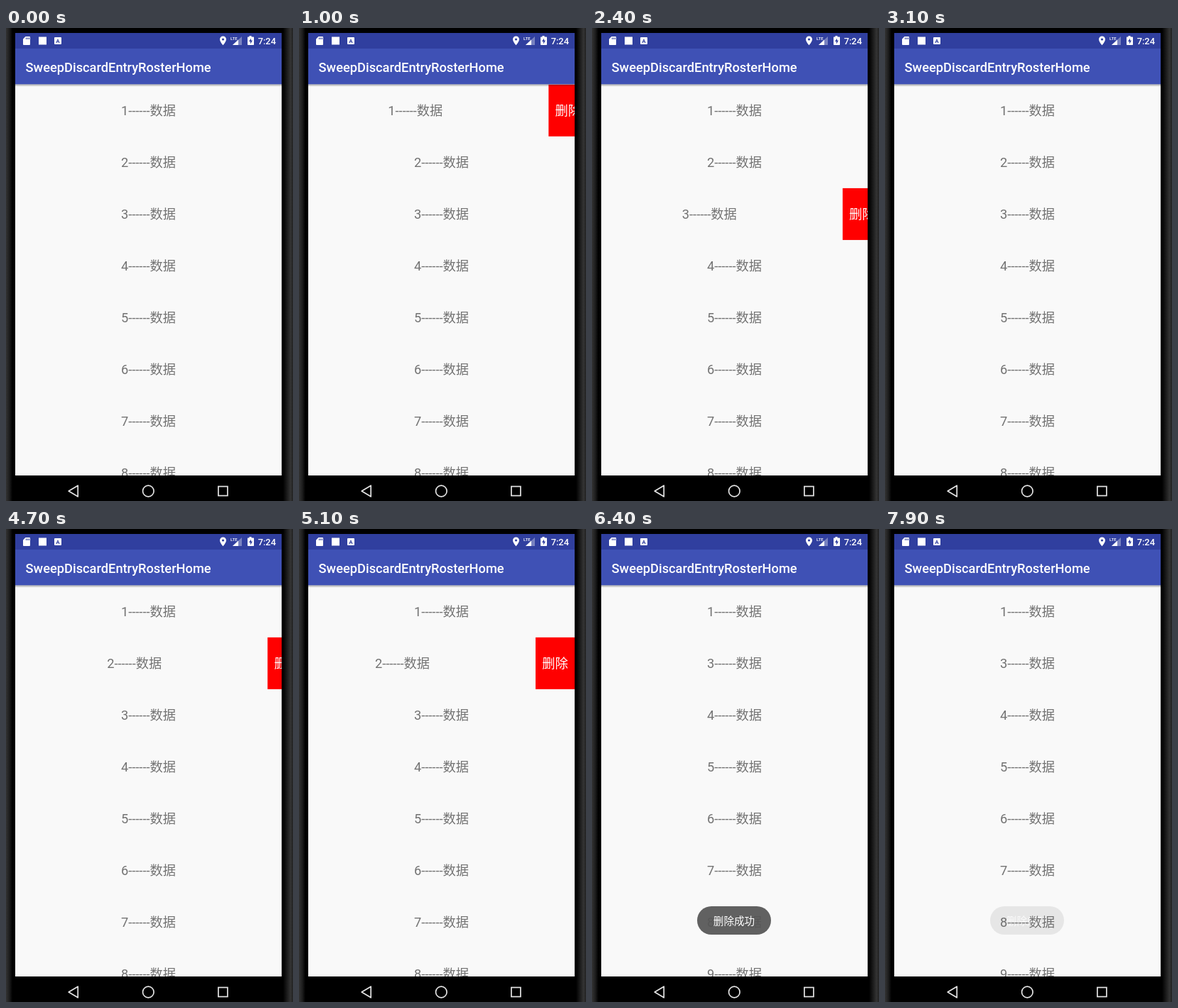
These frames come from a looping animation (404x667 px, 8000 ms). An HTML page:

```html
<!DOCTYPE html>
<html lang="zh-CN">
<head>
<meta charset="utf-8">
<title>Swipe to delete</title>
<style>
  html, body { margin: 0; width: 100%; height: 100%; overflow: hidden; background: #000; }
  svg { display: block; width: 404px; height: 667px; }
  text { font-family: Roboto, "Noto Sans CJK SC", "Noto Sans CJK", sans-serif; }
  .mid { text-anchor: middle; }
  .item { font-size: 18.25px; fill: #737373; }
  .delete { font-size: 18.25px; fill: #fff; }
  .bar { font-weight: 500; fill: #fff; }
</style>
</head>
<body>
<svg viewBox="0 0 404 667">
  <defs>
    <clipPath id="screen"><rect x="13" y="79" width="375" height="552"/></clipPath>
    <linearGradient id="shadow" x2="0" y2="1">
      <stop stop-opacity=".35"/><stop offset="1" stop-opacity="0"/>
    </linearGradient>
    <linearGradient id="leftEdge">
      <stop stop-color="#333"/><stop offset=".55" stop-color="#1c1c1c"/><stop offset="1"/>
    </linearGradient>
    <linearGradient id="rightEdge">
      <stop/><stop offset=".75" stop-color="#333"/><stop offset="1" stop-color="#222"/>
    </linearGradient>
  </defs>

  <rect width="404" height="667"/>
  <rect width="9" height="667" fill="url(#leftEdge)"/>
  <rect x="390" width="14" height="667" fill="url(#rightEdge)"/>

  <rect x="13" y="79" width="375" height="552" fill="#f9f9f9"/>
  <g clip-path="url(#screen)"><g id="list"></g></g>
  <rect x="13" y="79.300" width="375" height="3.500" fill="url(#shadow)"/>

  <rect x="13" y="7" width="375" height="22" fill="#303f9f"/>
  <rect x="13" y="29" width="375" height="50.300" fill="#3f51b5"/>
  <text class="bar" x="27.6" y="61.500" font-size="18.250">SweepDiscardEntryRosterHome</text>

  <!-- status icons -->
  <g fill="#fff">
    <path d="M27.500 12H33q1 0 1 1v10q0 1-1 1h-8q-1 0-1-1v-7.500z"/>
    <path d="M28.500 13.500v2.500m2-2.500v2.500m2-2.500v2.500" stroke="#303f9f"/>
    <rect x="46" y="12.500" width="11" height="11"/>
    <rect x="68" y="13" width="10" height="10" rx="1"/>
    <text class="mid" x="73" y="21" font-size="8" font-weight="700" style="fill:#303f9f">A</text>
    <path fill-rule="evenodd" d="M305.500 11.500a4.500 4.500 0 0 1 4.500 4.500c0 3.300-4.500 8.300-4.500 8.300s-4.500-5-4.500-8.300a4.500 4.500 0 0 1 4.500-4.500zm0 2.900a1.600 1.600 0 1 0 0 3.200 1.600 1.600 0 0 0 0-3.200z"/>
    <path d="M332 12v12h-13z" opacity=".35"/>
    <path d="M327 16.600V24h-8z"/>
    <text class="bar" x="316" y="16.500" font-size="6">LTE</text>
    <path d="M342.500 11h3v1.500h2.700q.8 0 .8.800v10q0 .7-.8.700h-7.400q-.8 0-.8-.700v-10q0-.8.800-.800h1.700z"/>
    <path d="M345 14.500l-3 4.500h2v3.500l3-5h-2z" fill="#303f9f"/>
  </g>
  <text class="bar" x="354.700" y="22.800" font-size="12.800">7:24</text>

  <!-- navigation icons -->
  <g fill="none" stroke="#e4e4e4" stroke-width="1.700">
    <path d="M88.200 653l13-7.800v15.600z" stroke-linejoin="round"/>
    <circle cx="200.300" cy="653" r="7.800"/>
    <rect x="298.900" y="646.500" width="13" height="13"/>
  </g>

  <g id="toast">
    <rect x="148" y="532" width="104" height="40" rx="20" fill="#555" fill-opacity=".92"/>
    <text class="mid" x="200" y="557.500" font-size="14.600" fill="#fff">删除成功</text>
  </g>
</svg>
<script>
const LOOP = 8000, STEP = 100;
const ROW = 73.04, TOP = 79.8, LEFT = 13, RIGHT = 388, BUTTON = 55;
const REMOVED = 2;

// Times in ms: the row opens, closes, pulls a glow out of the left edge and lets it go.
const swipes = {
  1: { open: 700, opened: 800, close: 900, closed: 1200, release: 1700, faded: 2000, glow: 8 },
  2: { open: 4600, opened: 5100 },
  3: { open: 2200, opened: 2700, close: 2900, closed: 3100, release: 3300, faded: 3500, glow: 5 }
};

const clamp = v => Math.min(1, Math.max(0, v));
const progress = (t, from, to) => clamp((t - from) / (to - from)) || 0;
const easeIn = p => p * p;
const easeOut = p => 1 - easeIn(1 - p);
const easeInOut = p => (1 - Math.cos(Math.PI * p)) / 2;

const swipeOffset = (s, t) =>
  BUTTON * (easeOut(progress(t, s.open, s.opened)) - progress(t, s.close, s.closed));

const glowDepth = (s, t) =>
  s.glow * (progress(t, s.closed, s.release) - easeIn(progress(t, s.release, s.faded))) || 0;

function glowPath(depth) {
  const rim = depth * .58, bulge = 2 * depth - rim;
  return `M${LEFT} 0h${rim}Q${LEFT + bulge} ${ROW / 2} ${LEFT + rim} ${ROW}H${LEFT}z`;
}

const list = document.getElementById('list');
const toast = document.getElementById('toast');
list.innerHTML = Array.from({ length: 9 }, (_, i) => `
  <g>
    <g>
      <text class="item mid" x="200.5" y="43.2">${i + 1}------数据</text>
      <rect x="${RIGHT}" width="${BUTTON}" height="${ROW}" fill="#f00"/>
      <text class="delete mid" x="${RIGHT + BUTTON / 2}" y="43.2">删除</text>
    </g>
    <path fill="#3f51b5"/>
  </g>`).join('');
const rows = [...list.children];

function draw(t) {
  const gap = easeInOut(progress(t, 6020, 6270));
  rows.forEach((row, i) => {
    const id = i + 1;
    const [content, glow] = row.children;
    const y = TOP + ROW * (i - (id > REMOVED ? gap : 0));
    row.setAttribute('transform', `translate(0 ${y})`);
    const swipe = swipes[id];
    if (!swipe) return;
    const depth = glowDepth(swipe, t);
    content.setAttribute('transform', `translate(${-swipeOffset(swipe, t)} 0)`);
    glow.setAttribute('d', glowPath(depth));
    glow.setAttribute('opacity', .38 * clamp(depth / 7));
  });
  rows[REMOVED - 1].setAttribute('opacity', 1 - progress(t, 5790, 6015));
  toast.setAttribute('opacity',
    easeOut(progress(t, 5780, 6310)) - easeIn(progress(t, 7450, 7930)));
}

const start = performance.now();
function tick() {
  const t = (performance.now() - start) % LOOP;
  draw(Math.floor(t / STEP) * STEP);
  requestAnimationFrame(tick);
}
tick();
</script>
</body>
</html>
```
